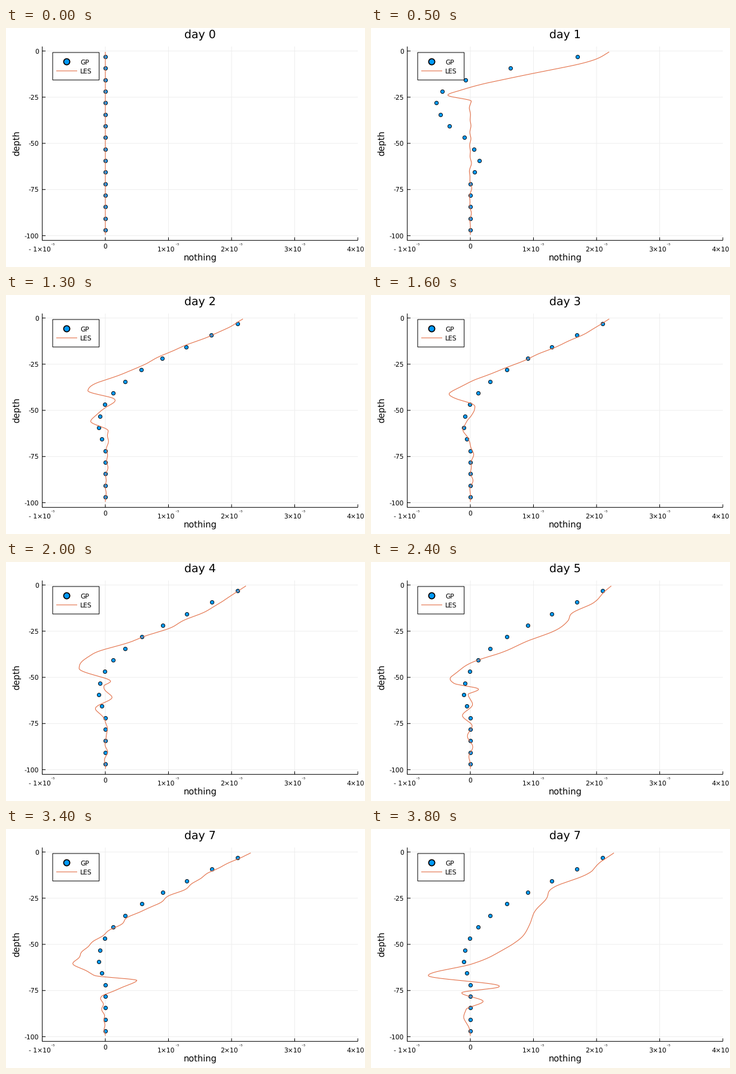
Write a matplotlib script that moves like this. It is 600 px wide and 400 px high and loops after 3900 ms.

```python
import numpy as np
import matplotlib.pyplot as plt
from matplotlib.animation import FuncAnimation
from matplotlib.patches import Rectangle

W, H, DPI = 600, 400, 100
FRAMES, STEP = 39, 100
PT = 72 / DPI                      # points per pixel
LEFT, RIGHT, TOP, BOTTOM = 60.6, 588, 31, 355.4
X0, DX = 166.0, 105.5              # pixel of zero, pixels per 1e-5
Y0, DY = 38.5, 3.091               # pixel of the surface, pixels per metre
Y_END = Y0 + 100 * DY
BLUE, ORANGE, GRID = "#009AFA", "#E36F47", "#EEEEEE"

plt.rcParams.update({"font.family": "DejaVu Sans", "text.hinting": "none"})
fig = plt.figure(figsize=(W / DPI, H / DPI), dpi=DPI, facecolor="white")
ax = fig.add_axes([0, 0, 1, 1])
ax.set(xlim=(0, W), ylim=(H, 0))
ax.axis("off")


def line(x, y, color="black", width=1.0, z=1):
    return ax.plot(x, y, color=color, lw=width * PT, zorder=z, snap=False,
                   solid_capstyle="butt", solid_joinstyle="round")[0]


def dots(x, y, size, edge, z):
    return ax.scatter(x, y, s=(size * PT) ** 2, fc=BLUE, ec="black",
                      lw=edge * PT, zorder=z, snap=False)


def label(x, y, text, size=10.8, ha="center", z=2, **kw):
    return ax.text(x, y, text, fontsize=size * PT, ha=ha, va="baseline",
                   zorder=z, **kw)


def draw_axes():
    for k in range(-1, 5):
        x = X0 + DX * k
        if -1 < k < 4:
            line([x, x], [TOP, BOTTOM], GRID, 1, 0)
        line([x, x], [BOTTOM, BOTTOM - 5])
        if k == 0:
            label(x, 369, "0")
            continue
        base, shift = (f"{k}×10", 11) if k > 0 else ("- 1×10", 14.4)
        label(x + shift, 374, base, ha="right")
        label(x + shift, 367, "⁻⁵", 8, ha="left")
    for depth in range(0, 101, 25):
        y = Y0 + DY * depth
        line([LEFT, RIGHT], [y, y], GRID, 1, 0)
        line([LEFT, LEFT + 5.5], [y, y])
        label(55.2, y + 4, str(-depth), ha="right")
    line([LEFT, LEFT], [TOP, BOTTOM])
    line([LEFT, RIGHT], [BOTTOM, BOTTOM])
    label(324.3, 388.5, "nothing", 14.67)
    label(22, 192.6, "depth", 14.67, rotation=90, rotation_mode="anchor")


def draw_legend():
    ax.add_patch(Rectangle((78, 41), 77.7, 46, fc="white", ec="black",
                           lw=PT, zorder=6, snap=False))
    dots([101.2], [56.4], 10.2, 1.7, 7)
    line([84, 119], [71.8, 71.8], ORANGE, 1.1, 7)
    label(124, 60.8, "GP", ha="left", z=7)
    label(124, 76.1, "LES", ha="left", z=7)


def smooth(x, xs, ys):
    """Monotone cubic curve through the given points."""
    h = np.diff(xs)
    d = np.diff(ys) / h
    m = np.zeros(len(xs))
    m[0], m[-1] = d[0], d[-1]
    same = np.flatnonzero(d[1:] * d[:-1] > 0)
    p, q = d[same], d[same + 1]
    m[same + 1] = 2 * p * q / (p + q)
    i = np.clip(np.searchsorted(xs, x) - 1, 0, len(h) - 1)
    t = (x - xs[i]) / h[i]
    return (ys[i] * (1 + 2 * t) * (1 - t) ** 2 + ys[i + 1] * t * t * (3 - 2 * t)
            + h[i] * (m[i] * t * (1 - t) ** 2 - m[i + 1] * t * t * (1 - t)))


def mixed_bottom(i):
    """The mixed layer deepens about as the square root of time."""
    return Y0 + 84 * (i / 5) ** 0.488


def scaled(y, i):
    """0..1 inside the mixed layer, 1..2 below it."""
    mix = mixed_bottom(i)
    return np.where(y < mix, (y - Y0) / (mix - Y0),
                    1 + (y - mix) / (Y_END - mix))


# Bends of the profile: surface, mixed layer, entrainment spike, wave below.
bends = {
    5: [(398, 40), (377, 52), (236, 83), (150, 104), (128, 112.5),
        (166, 122.5)],
    13: [(396, 40), (369, 56), (270, 97), (215, 124), (136, 160),
         (182, 175.5), (167, 188), (143, 211), (170, 228)],
    20: [(401, 40), (343, 77), (231, 126), (146, 154), (120, 178),
         (174, 199), (162, 207), (176, 226), (149, 247), (168, 266)],
    28: [(402, 40), (377, 71), (340, 91), (350, 103), (250, 160),
         (133, 216), (188, 226), (161, 235)],
    34: [(409, 40), (344, 71), (293, 103), (185, 162), (117, 225),
         (147, 245), (220, 253), (161, 280)],
    38: [(406, 40), (349, 80), (294, 108), (277, 138), (240, 192),
         (165, 226), (99, 245.5), (212, 263), (153, 274), (187, 288),
         (157, 302)],
}
stages = sorted(bends)
rows = np.linspace(40, 346, 400)


def shape(stage, u):
    x, y = np.array(bends[stage] + [(X0, 346)], float).T
    return smooth(u, scaled(y, stage), x)


def ripple(i):
    """Seeded turbulence, stronger as time goes on."""
    rng = np.random.default_rng(i)
    waves = sum(np.sin(rows / rng.uniform(3, 9) + rng.uniform(0, 6.3))
                for _ in range(3))
    calm = np.clip((rows - 40) / 30, 0, 1) * np.clip((346 - rows) / 30, 0, 1)
    return (0.6 + 0.04 * i) * calm * waves


def les(i):
    if i == 0:
        return np.full(rows.size, X0)
    k = np.clip(np.searchsorted(stages, i, "right") - 1, 0, len(stages) - 2)
    a, b = stages[k:k + 2]
    w = np.clip((i - a) / (b - a), 0, 1)
    u = scaled(rows, i)
    return (1 - w) * shape(a, u) + w * shape(b, u) + ripple(i)


def gp_profile(*bends):
    """Offsets at all 16 levels from a few (level, offset) pairs."""
    level, offset = np.array(bends + ((15, 0),), float).T
    return smooth(np.arange(16), level, offset)


gp_rows = Y0 + DY * (3.125 + 6.25 * np.arange(16))
gp_start = gp_profile((0, 59), (2, -102), (5, 0), (6, 14), (9, 0))
gp_mid = gp_profile((0, 179), (1, 66.5), (2, -8.5), (3, -47.5), (4, -57.5),
                    (6, -35.5), (7, -10), (9, 14.5), (11, 0))
gp_final = gp_profile((0, 221), (2, 136), (4, 61), (6, 13), (8, -9),
                      (9, -11.4), (11, 0))


def gp(i):
    if i == 0:
        offset = 0 * gp_final
    elif i <= 5:
        w = (np.sqrt(i) - 1) / (np.sqrt(5) - 1)
        offset = gp_start + w * (gp_mid - gp_start)
    else:
        rest = np.exp(-5 * ((i - 5) / 8) ** 1.5)
        offset = gp_final + rest * (gp_mid - gp_final)
    return X0 + offset


draw_axes()
draw_legend()
title = label(324.3, 17.3, "", 18.9)
points = dots(gp(0), gp_rows, 6.2, 0.9, 3)
curve = line(les(0), rows, ORANGE, 1.1, 4)


def draw(i):
    title.set_text(f"day {i * 5 // 24}")   # five hours per frame
    points.set_offsets(np.column_stack([gp(i), gp_rows]))
    curve.set_xdata(les(i))
    return title, points, curve


anim = FuncAnimation(fig, draw, frames=FRAMES, interval=STEP, repeat=True)
plt.show()
```
